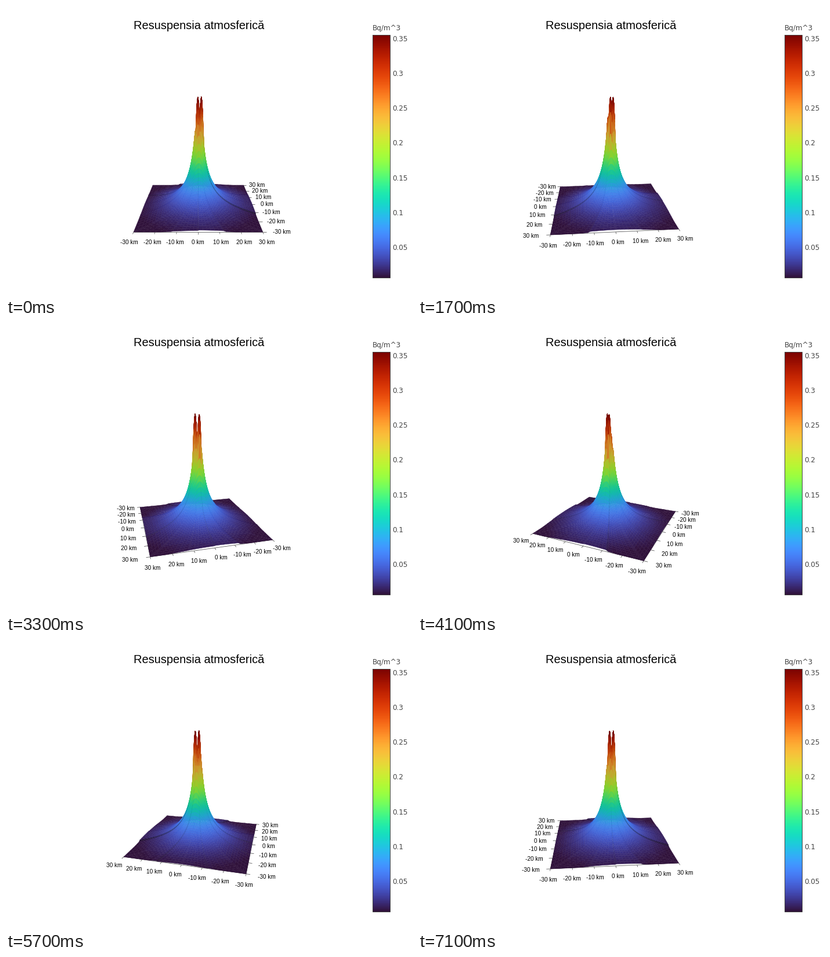
A matplotlib script for the animation above (7200 ms loop, 700x500 px).

```python
import numpy as np
import matplotlib.pyplot as plt
from matplotlib.animation import FuncAnimation
from matplotlib.collections import LineCollection, PolyCollection
from matplotlib.patches import Rectangle

W, H, DPI = 700, 500, 100
FRAMES, INTERVAL = 72, 100
CX, CY, FOCAL, DIST = 331.3, 254.7, 507, 2.63
SIN_E, COS_E = np.sin(np.radians(15)), np.cos(np.radians(15))
RINGS = 40
TICKS = np.arange(-30, 31, 10)
TURBO = plt.get_cmap("turbo")

# Small plateau height of each 22.5 degree slice, counted from east.
STEPS = np.array([6, 3, 3, 4, 7, -2, -2, -6, -6, -3, -3, -1, 3, -3, -3, 6]) / 1000
# Peaks at the summit: x, y, height.
PEAKS = [(-0.0025, 0.025, 1.0), (0.027, 0.0, 1.0), (0.0, -0.018, 0.83)]
PEAK_WIDTH = 0.036
SPREAD, CORE, DROP = 0.0445, 0.0225, 0.072


def px(size):
    return size * 72 / DPI


def view(x, y, angle):
    c, s = np.cos(angle), np.sin(angle)
    return x * c + y * s, y * c - x * s


def project(x, y, z, angle):
    """Screen position of a point; z runs from 0 (floor) to 1 (top)."""
    across, away = view(x, y, angle)
    up = z - 0.5
    scale = FOCAL / (DIST + away * COS_E - up * SIN_E)
    return CX + across * scale, CY - (up * COS_E + away * SIN_E) * scale


def step_height(deg):
    edges, levels = [], []
    for k in range(17):
        edges += [22.5 * k - 0.9, 22.5 * k + 0.9]
        levels += [STEPS[k - 1], STEPS[k % 16]]
    return np.interp(deg, edges, levels)


def height(x, y, deg):
    shift = np.exp(-8 * np.hypot(x, y))
    r = np.hypot(x - 0.008 * shift, y - 0.006 * shift)
    z = np.minimum(SPREAD / (r + CORE) - DROP, 0.7)
    z = z + step_height(deg) * np.clip(r / 0.12, 0, 1)
    for peak_x, peak_y, top in PEAKS:
        d2 = (x - peak_x) ** 2 + (y - peak_y) ** 2
        z = np.maximum(z, top - d2 / PEAK_WIDTH ** 2)
    return np.clip(z, 0, 1)


def quads(a):
    return np.stack([a[:-1, :-1], a[1:, :-1], a[1:, 1:], a[:-1, 1:]], -1).reshape(-1, 4)


# Polar mesh stretched to the square floor.
degs = np.concatenate([22.5 * k + np.r_[0, np.linspace(0.9, 21.6, 7)]
                       for k in range(16)] + [[360]])
rad = np.radians(degs)
reach = 0.5 / np.maximum(abs(np.cos(rad)), abs(np.sin(rad)))
rings = np.linspace(0, 1, RINGS + 1)[:, None] ** 2.1
gx, gy = rings * reach * np.cos(rad), rings * reach * np.sin(rad)
qx, qy = quads(gx), quads(gy)
qz = quads(height(gx, gy, np.broadcast_to(degs, gx.shape)))

mid_r = np.hypot(qx.mean(1), qy.mean(1))
slope = SPREAD / (mid_r + CORE) ** 2
base_rgb = TURBO(qz.mean(1))[:, :3] * (0.8 + 0.2 / np.hypot(1, slope))[:, None]

# Each step between slices is a small cliff, darker when it faces the viewer.
rise = np.diff(step_height(degs))
mid = (rad[1:] + rad[:-1]) / 2
downhill = -np.sign(rise)
cliff = np.tile(np.clip(abs(rise) * 2 / 0.007, 0, 1) * 0.33, RINGS)
cliff *= np.clip(mid_r / 0.14, 0, 1)
nx = np.tile(-np.sin(mid) * downhill, RINGS)
ny = np.tile(np.cos(mid) * downhill, RINGS)


def surface(angle):
    sx, sy = project(qx, qy, qz, angle)
    order = np.argsort(-view(qx, qy, angle)[1].mean(1))
    facing = nx * np.sin(angle) - ny * np.cos(angle)
    shade = 1 - cliff * np.clip(0.3 + 0.7 * facing, 0.12, 1)
    return np.stack([sx, sy], -1)[order], (base_rgb * shade[:, None])[order]


def axes_layout(angle):
    """Axis lines with ticks, and label centres, on the two near sides."""
    side_x = 0.5 if np.sin(angle + 1e-6) > 0 else -0.5
    side_y = -0.5 if np.cos(angle + 1e-6) > 0 else 0.5
    lines, spots = [], []
    for along_x in (True, False):
        side = side_y if along_x else side_x

        def place(t, out):
            across = side + np.sign(side) * out
            point = (t, across) if along_x else (across, t)
            return project(*point, 0, angle)

        lines.append([place(-0.5, 0), place(0.5, 0)])
        for t in TICKS / 60:
            lines.append([place(t, 0), place(t, 0.03)])
            spots.append(place(t, 0.146))
    return lines, spots


fig = plt.figure(figsize=(W / DPI, H / DPI), dpi=DPI, facecolor="white")
ax = fig.add_axes([0, 0, 1, 1])
ax.axis("off")

# Colour bar
ax.imshow(np.linspace(1, 0, 420)[:, None], cmap=TURBO, aspect="auto",
          extent=(632, 662, 470, 50), vmin=0, vmax=1)
ax.add_patch(Rectangle((632, 50), 30, 420, fill=False, ec="#444444", lw=px(1)))
bar_font = dict(family="DejaVu Sans", fontsize=px(12), color="#444444")
ax.text(632, 42, "Bq/m^3", **bar_font)
for i in range(1, 8):
    ax.text(666, 418 - (i - 1) * 60.3 + 4.3, f"{i * 0.05:.2f}".rstrip("0"), **bar_font)

ax.text(332.6, 40, "Resuspensia atmosferică", ha="center",
        family="Liberation Sans", fontsize=px(20), color="black")

axis_lines = LineCollection([], colors="#555555", linewidths=px(0.8), zorder=2)
mesh = PolyCollection([], edgecolors="face", linewidths=px(0.4), zorder=3)
ax.add_collection(axis_lines, autolim=False)
ax.add_collection(mesh, autolim=False)
labels = [ax.text(0, 0, f"{t} km", ha="center", va="center", zorder=4,
                  family="Liberation Sans", fontsize=px(10), color="black")
          for t in list(TICKS) * 2]
ax.set_xlim(0, W)
ax.set_ylim(H, 0)


def draw(i):
    angle = 2 * np.pi * i / FRAMES
    verts, colors = surface(angle)
    mesh.set_verts(verts)
    mesh.set_facecolor(colors)
    lines, spots = axes_layout(angle)
    axis_lines.set_segments(lines)
    for label, spot in zip(labels, spots):
        label.set_position(spot)
    return [mesh, axis_lines, *labels]


anim = FuncAnimation(fig, draw, frames=FRAMES, interval=INTERVAL,
                     repeat=True, repeat_delay=0, blit=False)
plt.show()
```
